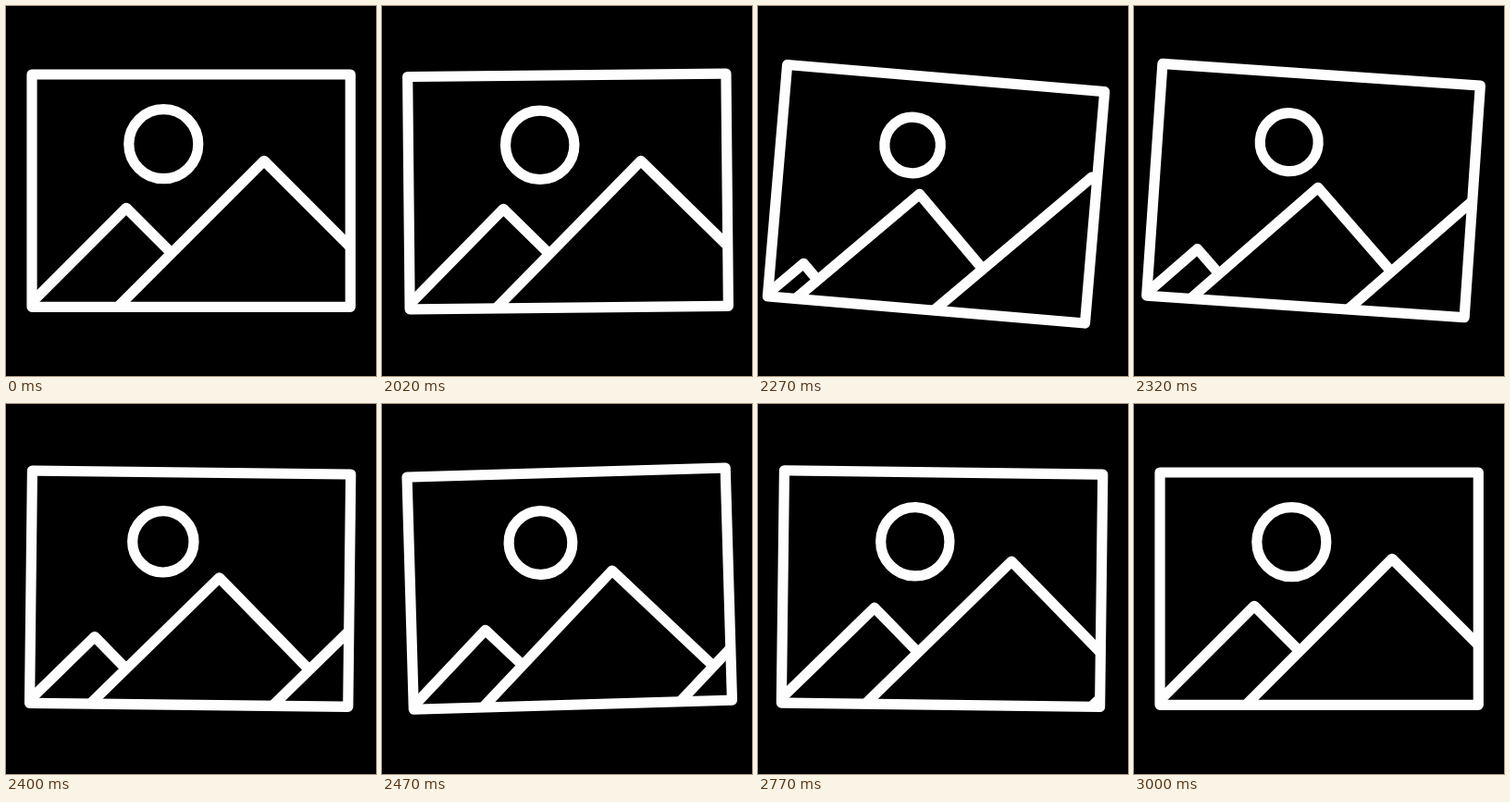
Write an HTML page with a canvas that moves like this. It is 400x400 px and loops after 3.02 s.

```html
<!DOCTYPE html>
<html lang="en">
<head>
<meta charset="utf-8">
<title>Picture icon</title>
<style>
html, body { margin: 0; height: 100%; overflow: hidden; background: #000; }
canvas { display: block; }
</style>
</head>
<body>
<canvas id="stage" width="400" height="400"></canvas>
<script>
const ctx = document.getElementById('stage').getContext('2d');
const LOOP = 3020, REST = 2000, MOVE = 1000;
const BOX = [28, 74, 344.3, 251.3];

// [progress, value] pairs, eased in and out between neighbours
const TILT = [[0, 0], [0.06, -2], [0.268, 4.85], [0.497, -1.9], [0.7, 1], [0.9, 0]];
const DROP = [[0, 0], [0.02, 0.8], [0.09, 0.8], [0.197, 9.5], [0.33, 0]];

function track(keys, u) {
  if (u <= keys[0][0]) return keys[0][1];
  for (let i = 1; i < keys.length; i++) {
    const [a, from] = keys[i - 1], [b, to] = keys[i];
    if (u < b) {
      const s = (u - a) / (b - a);
      return from + (to - from) * s * s * (3 - 2 * s);
    }
  }
  return keys[keys.length - 1][1];
}

// cubic-bezier(.4, 0, .12, 1), solved by bisection
function slide(u) {
  let lo = 0, hi = 1;
  for (let i = 0; i < 24; i++) {
    const s = (lo + hi) / 2, r = 1 - s;
    const x = 1.2 * r * r * s + 0.36 * r * s * s + s * s * s;
    if (x < u) lo = s; else hi = s;
  }
  return lo * lo * (3 - 2 * lo);
}

function sunRadius(u) {
  if (u < 0.2) return track([[0, 37.5], [0.2, 28.3]], u);
  return 37.5 - 9.2 * Math.pow(1 - (u - 0.2) / 0.8, 2.6);
}

// 45 degree slopes from the peak down past the base line
function mountain(x, y) {
  const h = 345 - y;
  ctx.beginPath();
  ctx.moveTo(x - h, y + h);
  ctx.lineTo(x, y);
  ctx.lineTo(x + h, y + h);
  ctx.fill();
  ctx.stroke();
}

function draw(u) {
  ctx.setTransform(1, 0, 0, 1, 0, 0);
  ctx.fillStyle = '#000';
  ctx.fillRect(0, 0, 400, 400);
  ctx.strokeStyle = '#fefefe';
  ctx.lineWidth = 11.2;
  ctx.lineJoin = 'round';

  ctx.translate(200, 110 + track(DROP, u));
  ctx.rotate(track(TILT, u) * Math.PI / 180);
  ctx.translate(-200, -110);

  ctx.beginPath();
  ctx.arc(170.3, 149.2, sunRadius(u), 0, 2 * Math.PI);
  ctx.stroke();

  ctx.save();
  ctx.beginPath();
  ctx.rect(...BOX);
  ctx.clip();
  // each mountain moves into the place of the next one
  const p = u > 0 && u < 1 ? slide(u) : 0;
  const sway = -4 * Math.sin(2 * Math.PI * Math.pow(p, 0.6));
  if (p > 0) mountain(28 + 102 * p, 320 - 102 * p + 10 * p * (1 - p));
  mountain(130 + 149 * p, 218.3 - 51 * p + sway);
  mountain(279 + 249 * p, 167.3);
  ctx.restore();

  ctx.strokeRect(...BOX);
}

const start = performance.now();
function tick() {
  const t = (performance.now() - start) % LOOP;
  draw(Math.min(1, Math.max(0, (t - REST) / MOVE)));
  requestAnimationFrame(tick);
}
tick();
</script>
</body>
</html>
```
